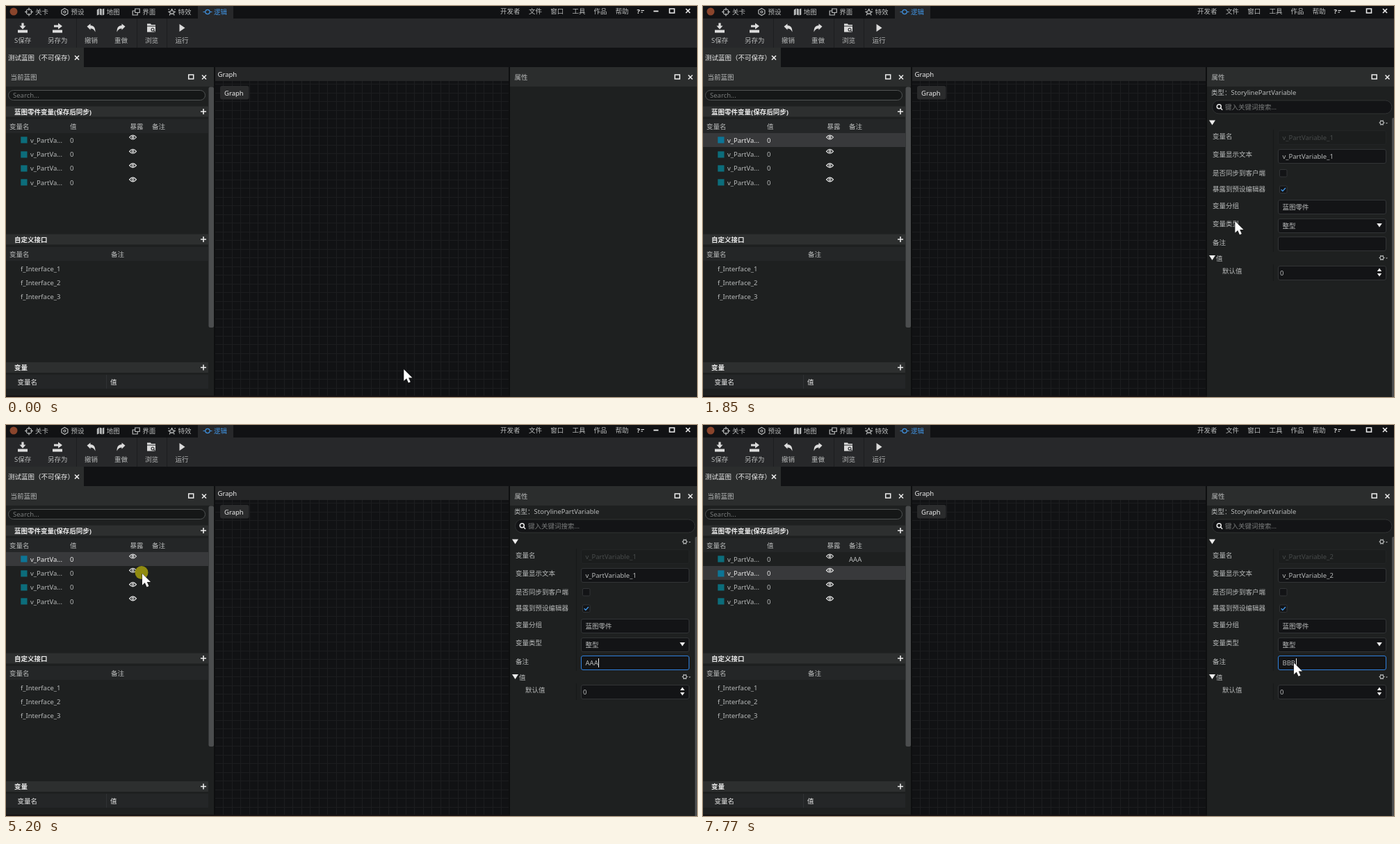
These frames come from a looping animation (994 px wide and 563 px high, 8 s). An HTML page with a canvas:

```html
<!DOCTYPE html>
<html lang="zh-CN">
<head>
<meta charset="utf-8">
<style>
html, body { margin: 0; width: 100%; height: 100%; overflow: hidden; background: #1e2020; }
canvas { display: block; }
</style>
</head>
<body>
<canvas id="stage" width="994" height="563"></canvas>
<script>
const ctx = document.getElementById('stage').getContext('2d');
const LOOP = 8000;
const C = {
  black: '#111214', body: '#1e2020', head: '#2b2d2d', bar: '#27282a', section: '#2d2f2f',
  table: '#242627', field: '#131416', edge: '#323436', text: '#b9bbbb', bright: '#ececec',
  dim: '#787a7a', blue: '#3f92e0', scroll: '#4b4d4e'
};

// Pointer tip: time, x, y
const path = [
  [0, 572.5, 523.5], [70, 560, 514], [140, 520, 482], [280, 375, 368], [420, 262, 282],
  [560, 190, 227], [700, 154, 199], [830, 145, 193],
  [1280, 145, 193], [1430, 235, 201], [1570, 420, 236], [1710, 620, 280], [1850, 765, 310],
  [2060, 854, 328], [2130, 874, 342], [2200, 870.5, 344],
  [2920, 870.5, 344], [2990, 873, 346],
  [4290, 873, 346], [4370, 790, 358], [4440, 660, 340], [4510, 533.5, 308.5], [4650, 350, 258],
  [4790, 250, 230], [4930, 208, 217], [5070, 196, 214],
  [5590, 196, 214], [5670, 250, 228], [5810, 480, 286], [5950, 735, 336], [6090, 838, 350],
  [6200, 848, 350], [6300, 853.5, 345],
  [6750, 853.5, 345], [6830, 855, 346], [6970, 850, 342.5]
];
const clicks = [[900, 1030], [2400, 2530], [5200, 5340], [6300, 6430]];
const caretOn = [[2790, 3310], [3510, 4370], [4900, 5270], [6830, 7370], [7440, 8000]];
const typed = [[3510, 'A'], [3640, 'AA'], [3840, 'AAA'], [5270, ''], [7470, 'B'], [7570, 'BB'], [7770, 'BBB']];

const within = (t, spans) => spans.some(([a, b]) => t >= a && t < b);

function pointerAt(t) {
  const i = path.findIndex(p => p[0] > t);
  if (i < 0) return path[path.length - 1].slice(1);
  const [t0, x0, y0] = path[i - 1], [t1, x1, y1] = path[i];
  const k = (t - t0) / (t1 - t0);
  return [x0 + (x1 - x0) * k, y0 + (y1 - y0) * k];
}

function rect(x, y, w, h, color) {
  ctx.fillStyle = color;
  ctx.fillRect(x, y, w, h);
}
function box(x, y, w, h, r, fill, stroke) {
  ctx.beginPath();
  ctx.roundRect(x, y, w, h, r);
  if (fill) { ctx.fillStyle = fill; ctx.fill(); }
  if (stroke) { ctx.strokeStyle = stroke; ctx.lineWidth = 1; ctx.stroke(); }
}
// Vertically centred on y, with the baseline on a whole pixel
function text(s, x, y, color = C.text, weight = 400) {
  ctx.font = weight + ' 9.5px "Noto Sans", "Noto Sans CJK SC", "Noto Sans CJK", sans-serif';
  ctx.fillStyle = color;
  ctx.fillText(s, x, Math.round(y + 3.5));
}
// Icon path relative to a centre point
function icon(d, x, y, color = C.text, width = 1.2, filled = false) {
  const p = new Path2D(d);
  ctx.save();
  ctx.translate(x, y);
  ctx.strokeStyle = ctx.fillStyle = color;
  ctx.lineWidth = width;
  if (filled) ctx.fill(p); else ctx.stroke(p);
  ctx.restore();
}
function disc(x, y, r, color) {
  ctx.beginPath();
  ctx.arc(x, y, r, 0, 7);
  ctx.fillStyle = color;
  ctx.fill();
}

const SHAPES = {
  target: 'M4 0A4 4 0 1 1 -4 0A4 4 0 1 1 4 0M0 -6V-2M0 2V6M-6 0H-2M2 0H6',
  hex: 'M0 -5L4.5 -2.5V2.5L0 5L-4.5 2.5V-2.5ZM1.5 0A1.5 1.5 0 1 1 -1.5 0A1.5 1.5 0 1 1 1.5 0',
  map: 'M-5 -3L-2 -5V4L-5 5ZM-1 -5L2 -4V5L-1 4ZM3 -4L5.5 -5V4L3 5Z',
  windows: 'M-1.5 -4.5H5V1H-1.5ZM-1.5 -1.5H-5V4.5H2V1',
  spark: 'M0 -4.5L1.2 -1.2L4.5 0L2 1.5L3.5 5M0 -4.5L-1.2 -1.2L-4.5 0L-2 1.5L-3.5 5M-1.5 3.5L0 2L1.5 3.5M-5 -4L-4 -3M4 -3L5 -4',
  node: 'M3.2 0A3.2 3.2 0 1 1 -3.2 0A3.2 3.2 0 1 1 3.2 0M-6.5 0H-3.2M3.2 0H6.5',
  save: 'M-1.6 -7H1.6V-3H4.5L0 2L-4.5 -3H-1.6ZM-7 3H7V7H-7Z',
  saveAs: 'M-5 -4H1V-7L7 -2.5L1 2V-1H-5ZM-7 3H7V7H-7Z',
  undo: 'M-6 -2L-1 -6V-3.5C4 -3.5 6 0 6 6C4 2 2 1 -1 1V3Z',
  redo: 'M6 -2L1 -6V-3.5C-4 -3.5 -6 0 -6 6C-4 2 -2 1 1 1V3Z',
  folder: 'M-6 -6H-1L0 -4.5H6V-3H-6ZM-6 -2H6V6H-6Z',
  play: 'M-3.5 -5.5L4.5 0L-3.5 5.5Z',
  cross: 'M-3 -3L3 3M3 -3L-3 3',
  square: 'M-3.5 -3H3.5V3H-3.5Z',
  plus: 'M-4 0H4M0 -4V4',
  down: 'M-4.5 -3.5H4.5L0 3.5Z',
  smallDown: 'M-3.8 -2.5H3.8L0 3Z',
  eye: 'M-5 0Q0 -6 5 0Q0 6 -5 0ZM1.4 0A1.4 1.4 0 1 1 -1.4 0A1.4 1.4 0 1 1 1.4 0',
  gear: 'M2.6 0A2.6 2.6 0 1 1 -2.6 0A2.6 2.6 0 1 1 2.6 0M-4 0H-2.6M2.6 0H4M-2 -3.5L-1.3 -2.3M2 -3.5L1.3 -2.3M-2 3.5L-1.3 2.3M2 3.5L1.3 2.3',
  pointer: 'M0 0V16.5L3.8 13L6.6 19.2L9.4 18L6.7 12H12Z'
};

function topBars() {
  rect(0, 0, 994, 18, C.black);
  rect(276, 0, 51, 18, C.bar);
  disc(11, 8, 5.5, '#8a452c');
  [['target', '关卡'], ['hex', '预设'], ['map', '地图'], ['windows', '界面'], ['spark', '特效'], ['node', '逻辑']]
    .forEach(([shape, label], i) => {
      const x = 33 + i * 51.4, color = i === 5 ? C.blue : C.text;
      icon(SHAPES[shape], x, 8.5, color, 1.2, shape === 'map');
      text(label, x + 9, 8.5, color);
    });
  text('开发者', 711, 7);
  ['文件', '窗口', '工具', '作品', '帮助'].forEach((s, i) => text(s, 752 + i * 31.2, 7));
  text('?', 907.5, 7, C.bright, 700);
  icon('M-2 -0.5H2.5M-2 2H0.5', 915.5, 7, C.bright, 1.2);
  icon('M-3.5 0H3.5', 935, 7.5, C.bright, 1.8);
  icon(SHAPES.square, 958, 7, C.bright, 1.6);
  icon(SHAPES.cross, 981, 7, C.bright, 1.6);

  rect(0, 18, 994, 42, C.bar);
  [101, 188, 231].forEach(x => rect(x, 18, 1, 42, '#1d1e20'));
  [['save', 'S保存', 24, 12], ['saveAs', '另存为', 74, 60], ['undo', '撤销', 122.5, 113],
   ['redo', '重做', 165.5, 156], ['folder', '浏览', 209, 200], ['play', '运行', 253, 243.5]]
    .forEach(([shape, label, cx, x]) => {
      icon(SHAPES[shape], cx, 31.5, '#dcdcdc', 1, true);
      text(label, x, 49.5);
    });
  icon('M4 2.5A2 2 0 1 1 0 2.5A2 2 0 1 1 4 2.5M3.5 4L5.5 6', 209, 31.5, C.bar, 1.1);

  rect(0, 60, 994, 28, C.black);
  rect(0, 60, 112, 28, C.head);
  text('测试蓝图（不可保存）', 3, 74.5, C.bright);
  icon(SHAPES.cross, 102, 74.5, C.bright, 1.6);
}

function panelHead(x, w, label) {
  rect(x, 88, w, 475, C.body);
  rect(x, 88, w, 28, C.head);
  text(label, x + 6.5, 102.5);
  const right = x + w - (x ? 0 : 4.5);
  icon(SHAPES.square, right - 28.3, 102, C.bright, 1.5);
  icon(SHAPES.cross, right - 9.5, 102.5, C.bright, 1.5);
}

function section(label, y) {
  rect(0, y - 7.5, 291, 15, C.section);
  text(label, 12, y, C.bright, 700);
  icon(SHAPES.plus, 284, y, C.bright, 1.6);
}

function leftPanel(selected, note) {
  panelHead(0, 299, '当前蓝图');
  box(3.5, 121.5, 283, 14, 7, '#151717', '#505353');
  text('Search...', 10, 128.5, C.dim);

  section('蓝图零件变量(保存后同步)', 152);
  rect(0, 163, 291, 20, C.table);
  [['变量名', 5], ['值', 92], ['暴露', 178.5], ['备注', 210]].forEach(([s, x]) => text(s, x, 173));
  for (let i = 0; i < 4; i++) {
    const y = 193.3 + i * 20.3, on = i === selected, color = on ? C.bright : C.text;
    if (on) rect(0, Math.round(y - 10.6), 291, 20, '#38393b');
    rect(21.3, Math.round(y - 5) + 0.3, 9.2, 9.2, on ? '#0d7596' : '#0c6d7b');
    text('v_PartVa...', 35, y, color);
    text('0', 92, y, color);
    icon(SHAPES.eye, 182.5, y - 4.3, C.bright, 1.1);
    if (!i) text(note, 210, y, color);
  }

  section('自定义接口', 336);
  rect(0, 347, 291, 20, C.table);
  text('变量名', 5, 357);
  text('备注', 151, 357);
  for (let i = 0; i < 3; i++) text('f_Interface_' + (i + 1), 21, 378 + i * 20.3);

  section('变量', 520.5);
  rect(0, 531, 291, 20, C.table);
  rect(144, 531, 1, 20, '#303234');
  text('变量名', 16.5, 541.5, C.bright);
  text('值', 150, 541.5, C.bright);
  box(291.5, 116.5, 7.5, 346.5, 2.5, C.scroll);
}

function graph() {
  rect(299, 88, 426, 475, '#0e0f10');
  rect(301, 88, 422, 20, '#252627');
  text('Graph', 304.5, 98, C.bright);
  rect(301, 108, 422, 455, C.black);
  for (let x = 312; x < 723; x += 12.5) rect(Math.round(x), 108, 1, 455, '#1c1d1f');
  for (let y = 112; y < 563; y += 12.5) rect(301, Math.round(y), 422, 1, '#1c1d1f');
  box(308, 115, 41.5, 19.5, 3, '#2a2b2c');
  text('Graph', 314, 125, C.bright);
}

function field(y, value, { border = C.edge, fill = C.field, color = C.text, x = 833.5 } = {}) {
  box(827.5, Math.floor(y - 9.5) + 0.5, 155, 20, 2.5, fill, border);
  text(value, x, y + 0.5, color);
}

function groupHead(y) {
  icon(SHAPES.down, 732.5, y, C.bright, 1, true);
  icon(SHAPES.gear, 976.5, y, C.text, 1.2);
  icon('M-1.5 -0.5H1.5L0 1Z', 983.5, y + 0.5, C.text, 1, true);
}

function properties(index, value, focused, caret) {
  const name = 'v_PartVariable_' + index;
  text('类型：', 731, 124);
  text('StorylinePartVariable', 759.5, 124);
  box(732.5, 136, 258.5, 19, 9.5, C.field, '#303233');
  icon('M2.3 -0.8A3 3 0 1 1 -3.7 -0.8A3 3 0 1 1 2.3 -0.8M1.5 1.5L4.2 4.2', 743, 145.5, C.bright, 1.5);
  text('键入关键词搜索...', 751, 145.5, C.dim);
  box(991, 161, 5, 404, 2, C.scroll);

  groupHead(168);
  rect(820, 178, 1, 176, '#171919');
  [['变量名', 187], ['变量显示文本', 213.5], ['是否同步到客户端', 240], ['暴露到预设编辑器', 263.5],
   ['变量分组', 287], ['变量类型', 313.5], ['备注', 340]].forEach(([s, y]) => text(s, 733, y));
  field(189, name, { border: '#222425', fill: '#1b1d1d', color: '#474a4a' });
  field(215.5, name);
  box(829.5, 235.5, 10.5, 10.5, 1.5, C.field, C.edge);
  box(829.5, 259, 10.5, 10.5, 1.5, C.field, C.edge);
  icon('M-3 0L-0.8 2.3L3.2 -2.2', 834.7, 264.2, C.blue, 1.5);
  field(289, '蓝图零件');
  field(315.5, '整型');
  icon(SHAPES.smallDown, 973, 315.5, C.bright, 1, true);
  field(342, value, { border: focused ? '#2f80dc' : C.edge });
  if (caret) rect(834 + Math.round(ctx.measureText(value).width), 336, 1, 13, C.bright);

  groupHead(362.5);
  text('值', 738, 363);
  rect(820, 372, 1, 24, '#171919');
  text('默认值', 747, 381.5);
  field(383.5, '0', { x: 830 });
  icon('M-3.2 -1.5H3.2L0 -6ZM-3.2 1.5H3.2L0 6Z', 973, 383.5, C.bright, 1, true);
}

function draw(t) {
  const second = t >= 5270;
  const selected = t < 1030 ? -1 : second ? 1 : 0;
  const value = typed.reduce((s, [at, v]) => t >= at ? v : s, '');

  topBars();
  leftPanel(selected, second ? 'AAA' : '');
  graph();
  panelHead(725, 269, '属性');
  if (within(t, [[1030, 5270], [5340, LOOP]])) {
    const focused = within(t, [[2400, 5270], [6300, LOOP]]);
    properties(selected + 1, value, focused, within(t, caretOn));
  }
  rect(0, 561, 725, 2, '#171314');

  const [x, y] = pointerAt(t);
  if (within(t, clicks)) disc(x - 1, y - 1.5, 9.5, '#908b10');
  icon(SHAPES.pointer, x, y, '#222', 1);
  icon(SHAPES.pointer, x, y, '#fff', 1, true);
}

function frame(now) {
  draw(now % LOOP);
  requestAnimationFrame(frame);
}
requestAnimationFrame(frame);
</script>
</body>
</html>
```
